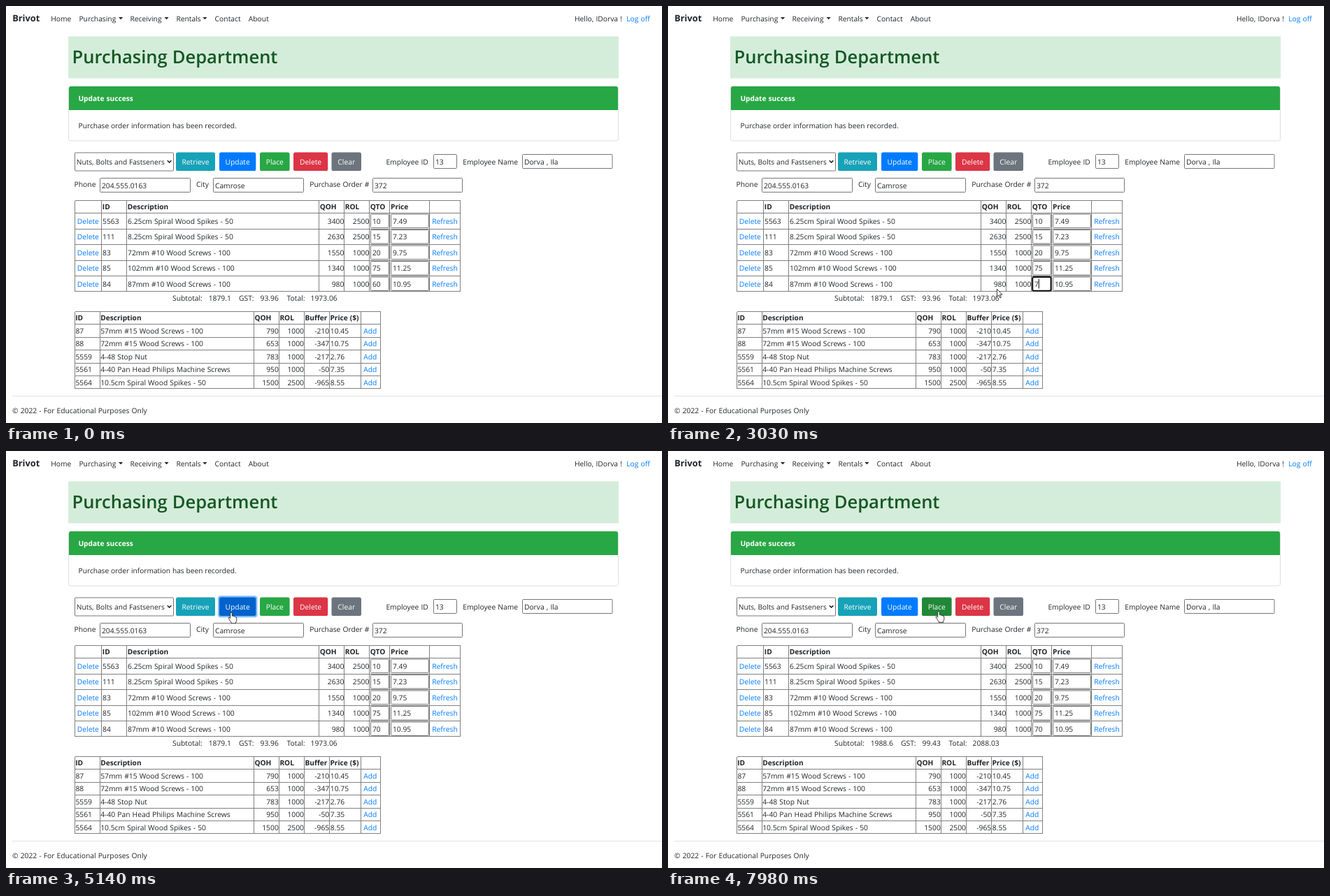
Animation, 938 px wide and 597 px high, one loop 8 s. Source, as an HTML page:

```html
<!DOCTYPE html>
<html lang="en">
<head>
<meta charset="utf-8">
<title>Purchasing Department</title>
<style>
html, body { margin: 0; width: 100%; height: 100%; overflow: hidden; background: #fff; }
svg { display: block; width: 938px; height: 597px; }
text { font: 10.3px "Open Sans", "Noto Sans", sans-serif; word-spacing: .4px; fill: #212529; text-rendering: geometricPrecision; white-space: pre; }
.b { font-size: 10.16px; font-weight: 700; }
.prose { font-size: 10.16px; word-spacing: .2px; }
.brand { font-size: 12.8px; font-weight: 700; }
.title { font-size: 25.55px; font-weight: 600; fill: #155724; }
.link { fill: #007bff; }
.white { fill: #fff; }
.mid { text-anchor: middle; }
.end { text-anchor: end; }
.line { stroke: #808080; shape-rendering: crispEdges; fill: none; }
.box { fill: #fff; stroke: #767676; }
</style>
</head>
<body>
<svg id="stage" viewBox="0 0 938 597"></svg>
<script>
const stage = document.getElementById('stage');

function el(tag, attrs, parent = stage) {
  const node = document.createElementNS('http://www.w3.org/2000/svg', tag);
  for (const key in attrs) node.setAttribute(key, attrs[key]);
  parent.appendChild(node);
  return node;
}
function text(x, y, str, cls = '') {
  const node = el('text', { x, y, class: cls });
  node.textContent = str;
  return node;
}
const rect = (x, y, width, height, attrs) => el('rect', { x, y, width, height, ...attrs });
const path = (d, attrs) => el('path', { d, ...attrs });
const show = (node, on) => node.setAttribute('visibility', on ? 'visible' : 'hidden');

function field(x, y, w, h, value) {
  rect(x + .5, y + .5, w - 1, h - 1, { class: 'box', rx: 1 });
  return text(x + 2.9, y + h / 2 + 4, value);
}
function grid(xs, ys) {
  const [x0, x1, y0, y1] = [xs[0], xs.at(-1), ys[0], ys.at(-1)];
  path(xs.map(x => `M${x} ${y0}V${y1}`).join('') + ys.map(y => `M${x0} ${y}H${x1}`).join(''), { class: 'line' });
}

// Navigation
text(9.2, 22.4, 'Brivot', 'brand');
[[64.2, 'Home'], [104.4, 'Purchasing', 161], [177.4, 'Receiving', 226.5], [243.4, 'Rentals', 281.3],
 [298.6, 'Contact'], [346.8, 'About']].forEach(([x, label, caret]) => {
  text(x, 21.7, label);
  if (caret) path(`M${caret} 16h6.2l-3.1 3.2z`, { fill: '#212529' });
});
text(813, 21.7, 'Hello, IDorva !');
text(887.2, 21.7, 'Log off', 'link');

// Heading and message card
rect(89, 43.5, 787, 60, { fill: '#d4edda' });
text(94.6, 81.6, 'Purchasing Department', 'title');
rect(89.5, 115.5, 786, 77.5, { rx: 2.7, fill: '#fff', stroke: '#dfdfdf' });
path('M90 149V118q0-3 3-3H872q3 0 3 3V149z', { fill: '#28a745' });
text(103.4, 135.7, 'Update success', 'b white');
text(103.6, 174.6, 'Purchase order information has been recorded.', 'prose');

// Toolbar
rect(98.5, 210, 141, 26, { class: 'box', rx: 1 });
text(100.8, 227, 'Nuts, Bolts and Fastseners', 'prose');
path('M230.8 221.3l2.8 2.8 2.8-2.8', { fill: 'none', stroke: '#111', 'stroke-width': 1.4 });

const ring = rect(303, 207.3, 56.4, 31, { rx: 4, fill: '#80bdff' });
function button(x, w, label, fill) {
  const face = rect(x, 209.5, w, 26.6, { rx: 2.7, fill });
  text(x + w / 2, 226.8, label, 'white mid');
  return face;
}
button(243, 56, 'Retrieve', '#17a2b8');
const updateBtn = button(305, 52.3, 'Update', '#007bff');
const placeBtn = button(363, 42.6, 'Place', '#28a745');
button(411, 49.2, 'Delete', '#dc3545');
button(465.5, 42.5, 'Clear', '#6c757d');

text(543.4, 226.8, 'Employee ID');
field(611, 212, 34, 21, '13');
text(653.2, 226.8, 'Employee Name');
field(738, 212, 129.5, 21, 'Dorva , Ila');
text(97.6, 259, 'Phone');
field(134, 246, 130, 21, '204.555.0163');
text(272, 259, 'City');
field(296, 246, 130, 21, 'Camrose');
text(434.2, 259, 'Purchase Order #');
field(524, 246, 129, 21, '372');

// Order lines
grid([98.5, 136.5, 172.5, 447.5, 483.5, 519.5, 548.5, 605.5, 649.5],
     [278.5, 296.5, 319.5, 341.5, 364.5, 386.5, 408.5]);
'ID,137.8|Description,173.8|QOH,448.7|ROL,484.8|QTO,520.8|Price,550'.split('|').forEach(h => {
  const [label, x] = h.split(',');
  text(+x, 291.1, label, 'b');
});
let qty;
['5563|6.25cm Spiral Wood Spikes - 50|3400|2500|10|7.49',
 '111|8.25cm Spiral Wood Spikes - 50|2630|2500|15|7.23',
 '83|72mm #10 Wood Screws - 100|1550|1000|20|9.75',
 '85|102mm #10 Wood Screws - 100|1340|1000|75|11.25',
 '84|87mm #10 Wood Screws - 100|980|1000|60|10.95'].forEach((row, i) => {
  const [id, name, qoh, rol, qto, price] = row.split('|');
  const y = 311.8 + i * 22.5;
  text(101.8, y, 'Delete', 'link');
  text(138, y, id);
  text(174, y, name);
  text(483.4, y, qoh, 'end');
  text(519.4, y, rol, 'end');
  qty = field(521, y - 14.25, 27, 20.5, qto);
  field(550, y - 14.25, 55, 20.5, price);
  text(609.2, y, 'Refresh', 'link');
});

// Totals
text(238, 421.8, 'Subtotal:');
text(333, 421.8, 'GST:');
text(401.6, 421.8, 'Total:');
const totals = [289.7, 363.6, 435.6].map(x => text(x, 421.8, ''));

// Stock list
grid([98.5, 134.5, 354.5, 390.5, 426.5, 462.5, 507.5, 535.5],
     [437.5, 455.5, 474.5, 492.5, 511.5, 529.5, 547.5]);
'ID,99.2|Description,135.2|QOH,355.4|ROL,391.4|Buffer,427.4|Price ($),463.4'.split('|').forEach(h => {
  const [label, x] = h.split(',');
  text(+x, 450.4, label, 'b');
});
['87|57mm #15 Wood Screws - 100|790|1000|-210|10.45',
 '88|72mm #15 Wood Screws - 100|653|1000|-347|10.75',
 '5559|4-48 Stop Nut|783|1000|-217|2.76',
 '5561|4-40 Pan Head Philips Machine Screws|950|1000|-50|7.35',
 '5564|10.5cm Spiral Wood Spikes - 50|1500|2500|-965|8.55'].forEach((row, i) => {
  const [id, name, qoh, rol, buffer, price] = row.split('|');
  const y = 468.7 + i * 18.5;
  text(99.4, y, id);
  text(135.2, y, name);
  text(389.8, y, qoh, 'end');
  text(426, y, rol, 'end');
  text(462.2, y, buffer, 'end');
  text(463.8, y, price);
  text(511.2, y, 'Add', 'link');
});

// Footer
path('M9 558.5H938', { stroke: '#e3e3e3' });
text(9, 582.7, '© 2022 - For Educational Purposes Only');

// Editing state of the last quantity field
const digit = 5.88;
const qtyX = 523.9;
const focus = rect(521.2, 388, 26.4, 19.8, { rx: 2, fill: 'none', stroke: '#101010', 'stroke-width': 2 });
const mark = rect(qtyX, 391, 2 * digit, 14, { fill: '#0078d7' });
const picked = text(qtyX + 2 * digit, 401.8, '', 'white end');
const caret = rect(qtyX, 391, 1, 13.5, { fill: '#000' });

// Pointers, each with its hot spot at 0,0
const ink = { fill: '#fff', stroke: '#222', 'stroke-width': .9, 'stroke-linejoin': 'round' };
const pointers = {
  arrow: path('M.4 .3V11.3L2.9 9 4.7 12.9 6.4 12.1 4.7 8.3H8z', ink),
  beam: path('M-2-6H-.6L0-5.4 .6-6H2M0-5.4V5.4M-2 6H-.6L0 5.4 .6 6H2', { fill: 'none', stroke: '#222' }),
  hand: path('M-1.3 1.2Q-1.2 .1 0 .1T1.3 1.3V5.2Q3.2 4.6 3.7 5.8 5.5 5.4 5.9 6.6 7.8 6.4 7.8 8.2V11.2Q7.6 13 6.6 14V15.8H.2V14.4Q-1.6 12.6-2.4 10.8L-4 8.4Q-4 7-2.6 7.4L-1.3 8.6z', ink)
};

const out = p => 1 - (1 - p) * (1 - p);
const smooth = p => p * p * (3 - 2 * p);
const linear = p => p;
// start, end, steps, from x, y, to x, y, easing, pointer
const moves = [
  [990, 1750, 12, 1000, 585, 559.5, 414, out, 'arrow'],
  [1820, 2020, 4, 559.5, 414, 538, 398, out, 'beam'],
  [2090, 2360, 4, 538, 398, 478, 404, smooth, 'beam'],
  [2430, 2430, 1, 478, 404, 470, 405, linear, 'arrow'],
  [4120, 4740, 10, 470, 405, 322, 240, smooth, 'arrow'],
  [4800, 4870, 2, 322, 240, 322, 231, linear, 'hand'],
  [5680, 6160, 8, 322, 231, 960, 360, smooth, 'arrow'],
  [7090, 7840, 12, 948, 655, 390, 243, out, 'arrow'],
  [7910, 7980, 2, 390, 243, 387, 229.5, linear, 'hand']
];

function pointerAt(t) {
  const m = moves.findLast(m => t >= m[0]);
  if (!m) return { x: 999, y: 999, kind: 'arrow' };
  const [t0, t1, n, x0, y0, x1, y1, ease, kind] = m;
  const step = t >= t1 ? n - 1 : Math.floor((t - t0) / (t1 - t0) * (n - 1) + .05);
  const e = ease((step + 1) / n);
  return { x: x0 + (x1 - x0) * e, y: y0 + (y1 - y0) * e, kind };
}

function draw(t) {
  const p = pointerAt(t);
  for (const kind in pointers) {
    show(pointers[kind], kind === p.kind);
    pointers[kind].setAttribute('transform', `translate(${p.x} ${p.y})`);
  }

  const editing = t >= 2090 && t < 4940;
  const chars = editing && t < 3030 ? (p.x < 527 ? 2 : p.x < 533 ? 1 : 0) : 0;
  qty.textContent = t < 3030 ? '60' : t < 3190 ? '7' : '70';
  show(focus, editing);
  show(mark, chars > 0);
  mark.setAttribute('x', qtyX + (2 - chars) * digit);
  mark.setAttribute('width', chars * digit);
  picked.textContent = '60'.slice(2 - chars);

  const blink = t < 3190 || Math.floor((t - 3190) / 530) % 2 === 0;
  show(caret, editing && t >= 3030 && blink);
  caret.setAttribute('x', qtyX + digit * (t < 3190 ? 1 : 2));

  const pressed = t >= 4940 && t < 5210;
  show(ring, pressed);
  updateBtn.setAttribute('fill', pressed ? '#0062cc' : t >= 4800 && t < 5680 ? '#0069d9' : '#007bff');
  placeBtn.setAttribute('fill', t >= 7910 ? '#218838' : '#28a745');

  const sums = t < 5210 ? ['1879.1', '93.96', '1973.06'] : ['1988.6', '99.43', '2088.03'];
  totals.forEach((node, i) => { node.textContent = sums[i]; });
}

const begin = performance.now();
function tick() {
  draw((performance.now() - begin) % 8000);
  requestAnimationFrame(tick);
}
tick();
</script>
</body>
</html>
```
